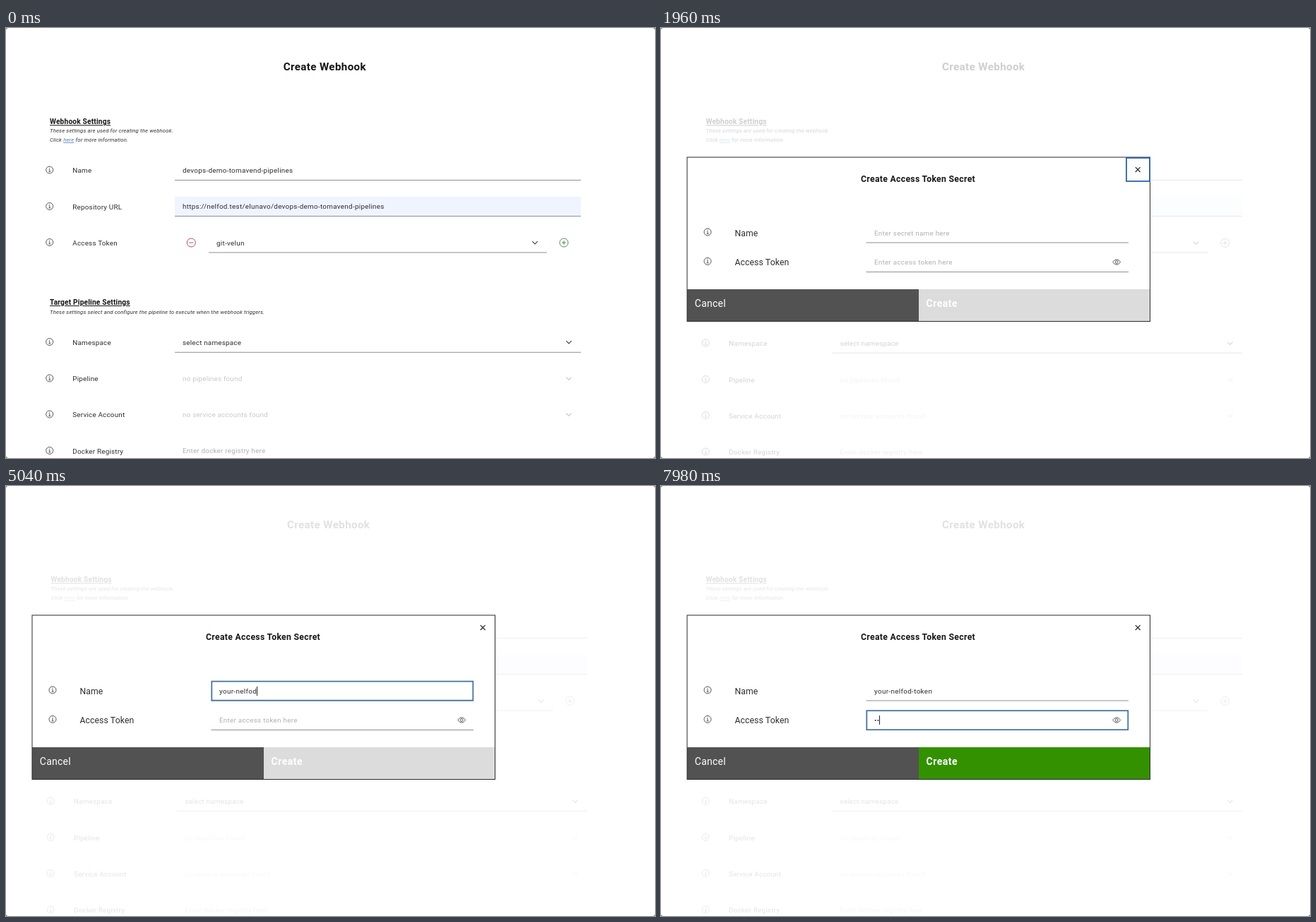
Write an HTML page that moves like this. It is 919 px wide and 609 px high and loops after 8000 ms.

```html
<!DOCTYPE html>
<html lang="en">
<head>
<meta charset="utf-8">
<title>Create Webhook</title>
<style>
  html, body { margin: 0; width: 100%; height: 100%; overflow: hidden; background: #777; }
  #stage { position: relative; width: 919px; height: 609px; overflow: hidden; border-radius: 4px; background: #fff; }
  #stage > *, svg { position: absolute; left: 0; top: 0; width: 919px; height: 609px; }

  text, .input { font-family: Roboto, "Open Sans", sans-serif; font-size: 9.9px; letter-spacing: .2px; fill: #2e2e2e; }
  .title { font-size: 15.2px; font-weight: 600; letter-spacing: .35px; fill: #161616; }
  .head { font-size: 10.2px; font-weight: 600; letter-spacing: .17px; fill: #161616; text-decoration: underline; }
  .note { font-size: 7.8px; font-style: italic; letter-spacing: .14px; fill: #333; }
  .link { fill: #4f7fb5; text-decoration: underline; }
  .value { letter-spacing: .28px; }
  .off { fill: #c8c8c8; }
  .empty { fill: #b0b0b0; }
  .dtitle { font-size: 12.2px; font-weight: 600; letter-spacing: .33px; fill: #161616; }
  .dlabel { font-size: 12.2px; letter-spacing: .13px; }
  .button { font-size: 14px; letter-spacing: .25px; fill: #fff; }
  .strong { font-weight: 600; letter-spacing: .5px; }

  .icon { fill: none; stroke: #444; stroke-width: .9; }
  .rule { stroke: #8f8f8f; stroke-width: 1; }
  .ring { fill: none; stroke: #47759f; stroke-width: 1.8; }

  .input { position: absolute; left: 302px; height: 13px; line-height: 13px; display: flex; white-space: pre; color: #2e2e2e; letter-spacing: .33px; }
  .caret { width: 1px; height: 13px; margin-right: -1px; background: #222; }
  .hint { color: #b0b0b0; letter-spacing: .25px; }
  .typed:not(:empty) ~ .hint { display: none; }

  #narrow, #wide, #veil, #dialog, .ring, .caret, #create { animation: 8s linear -5ms infinite; }
  #narrow { animation-name: narrow; animation-timing-function: step-end; }
  #wide { animation-name: wide; animation-timing-function: step-end; }
  #veil { background: #fff; animation-name: veil; }
  #dialog { animation-name: dialog; }
  #create { fill: #dcdcdc; animation-name: create; }
  .ring, .caret { animation-timing-function: step-end; }
  #ringClose { stroke: #2c63b0; animation-name: ringClose; }
  #ringName { animation-name: ringName; }
  #ringInfo { stroke: #5470a8; stroke-width: 1; animation-name: ringInfo; }
  #ringToken, #caretToken { animation-name: ringToken; }
  #caretName { animation-name: caretName; }

  @keyframes narrow { 0% { visibility: visible } 15.75%, 100% { visibility: hidden } }
  @keyframes wide { 0% { visibility: hidden } 15.75%, 100% { visibility: visible } }
  @keyframes veil {
    0% { opacity: 0 }
    15.75% { opacity: 0; animation-timing-function: steps(11) }
    25.375%, 100% { opacity: .87 }
  }
  @keyframes dialog {
    0% { opacity: 0; transform: translateY(-24px) }
    15.75% { opacity: 0; transform: translateY(-24px); animation-timing-function: steps(3) }
    18.375% { opacity: .65; transform: translateY(-5.5px); animation-timing-function: steps(2) }
    20.125%, 100% { opacity: 1; transform: none }
  }
  @keyframes create {
    0% { fill: #dcdcdc }
    97.125% { fill: #dcdcdc; animation-timing-function: steps(2) }
    98.875%, 100% { fill: #339100 }
  }
  @keyframes ringClose { 0% { opacity: 1 } 29.75%, 100% { opacity: 0 } }
  @keyframes ringName { 0% { opacity: 0 } 29.75% { opacity: 1 } 84.875%, 100% { opacity: 0 } }
  @keyframes ringInfo { 0% { opacity: 0 } 84.875% { opacity: 1 } 91%, 100% { opacity: 0 } }
  @keyframes ringToken { 0% { opacity: 0 } 91%, 100% { opacity: 1 } }
  @keyframes caretName {
    0% { opacity: 0 }
    29.75% { opacity: 1 } 35.875% { opacity: 0 }
    42.875% { opacity: 1 } 71.75% { opacity: 0 }
    76.125% { opacity: 1 } 84.875%, 100% { opacity: 0 }
  }
</style>
</head>
<body>
<div id="stage">
  <svg id="narrow"></svg>
  <svg id="wide"></svg>
  <div id="veil"></div>
  <div id="dialog">
    <svg id="panel"></svg>
    <div class="input" style="top:284px"><span class="typed" id="name"></span><i class="caret" id="caretName"></i><span class="hint">Enter secret name here</span></div>
    <div class="input" style="top:325px"><span class="typed" id="token"></span><i class="caret" id="caretToken"></i><span class="hint">Enter access token here</span></div>
  </div>
</div>
<script>
  const $ = id => document.getElementById(id);

  const text = (x, y, cls, str) => `<text x="${x}" y="${y}" class="${cls}">${str}</text>`;
  const line = (x1, x2, y) => `<line class="rule" x1="${x1}" x2="${x2}" y1="${y}" y2="${y}"/>`;
  const rect = (x, y, w, h, attrs) => `<rect x="${x}" y="${y}" width="${w}" height="${h}" ${attrs}/>`;
  const icon = (x, y, shape, color = '#444') =>
    `<g class="icon" transform="translate(${x} ${y})" style="stroke:${color}">${shape}</g>`;

  const info = '<circle r="5"/><path d="M-1-.8H.1V2.4M-1.4 2.4H1.5M-.5-2.6H.6"/>';
  const minus = '<circle r="6"/><path d="M-3 0H3"/>';
  const plus = '<circle r="6"/><path d="M-3 0H3M0-3V3"/>';
  const chevron = '<path stroke-width="1.2" d="M-3.7-1.8L0 1.9L3.7-1.8"/>';
  const cross = '<path stroke-width="1.2" d="M-3.4-3.4L3.4 3.4M3.4-3.4L-3.4 3.4"/>';
  const eye = '<path d="M-5.5 0Q0-7.4 5.5 0Q0 7.4-5.5 0Z"/><circle r="1.9"/>';

  // The form grows a little once the scrollbar is gone.
  function form(wide) {
    const X = x => wide ? +(x * 1.01 + .9).toFixed(1) : x;
    const Y = y => wide ? y + (y > 350 ? 1.5 : y > 190 ? .4 : 0) : y;
    const at = (x, y, cls, str) => text(X(x), Y(y), cls, str);
    const rule = (x1, x2, y) => line(X(x1), X(x2), wide && y > 350 ? y + 1 : y);
    const mark = (x, y, shape, color) => icon(X(x), Y(y), shape, color);

    const labels = [['Name', 205], ['Repository URL', 256.5], ['Access Token', 307.5], ['Namespace', 448.5],
      ['Pipeline', 500], ['Service Account', 551], ['Docker Registry', 602.5]];

    return [
      text(wide ? 398 : 392.7, 59.6, 'title', 'Create Webhook'),
      at(62, 136.3, 'head', 'Webhook Settings'),
      at(62, 148.4, 'note', 'These settings are used for creating the webhook.'),
      at(62, 161.2, 'note', 'Click <tspan class="link">here</tspan> for more information.'),
      at(62, 392, 'head', 'Target Pipeline Settings'),
      at(62, 404.8, 'note', 'These settings select and configure the pipeline to execute when the webhook triggers.'),
      ...labels.map(([str, y]) => mark(61.7, y - 4, info) + at(94.3, y, '', str)),

      at(250, 205, 'value', 'devops-demo-tomavend-pipelines'),
      rule(239, 814, 215.5),
      rect(X(239), 239, X(814) - X(239), 28, 'fill="#eff4ff"'),
      rule(239, 814, 266.5),
      at(250, 256, 'value', 'https://nelfod.test/elunavo/devops-demo-tomavend-pipelines'),
      mark(262.3, 304, minus, '#a04545'),
      at(298, 307.5, 'value', 'git-velun'),
      mark(749, 304, chevron),
      rule(287, 766, 318),
      mark(790, 304, plus, '#3f7a42'),

      at(250, 448.5, '', 'select namespace'),
      mark(797, 445, chevron),
      rule(239, 814, 459.3),
      at(250, 500, 'off', 'no pipelines found'),
      mark(797, 496.5, chevron, '#c8c8c8'),
      at(250, 551, 'off', 'no service accounts found'),
      mark(797, 547.5, chevron, '#c8c8c8'),
      at(250, 602, 'empty', 'Enter docker registry here')
    ].join('');
  }

  const panel = () => [
    rect(37, 183, 655.5, 232.5, 'fill="#fff"'),
    rect(37, 370, 328, 45.5, 'fill="#525252"'),
    rect(365, 370, 327.5, 45.5, 'id="create"'),
    rect(37, 183, 655.5, 232.5, 'fill="none" stroke="#2a2a2a"'),
    text(283, 217.7, 'dtitle', 'Create Access Token Secret'),
    icon(675.2, 200.6, cross, '#222'),
    rect(659, 184, 33, 33, 'class="ring" id="ringClose"'),
    icon(66, 289, info),
    text(104.4, 294.5, 'dlabel', 'Name'),
    line(290.5, 662, 304),
    rect(291.3, 276.7, 370, 27, 'class="ring" id="ringName"'),
    rect(59.7, 324.2, 12.6, 12.6, 'class="ring" id="ringInfo"'),
    icon(66, 330.4, info),
    text(104.4, 335.9, 'dlabel', 'Access Token'),
    line(290.5, 662, 345.5),
    rect(291.3, 318.2, 370, 27, 'class="ring" id="ringToken"'),
    icon(645.2, 331.5, eye),
    text(47.8, 395, 'button', 'Cancel'),
    text(375.6, 395, 'button strong', 'Create')
  ].join('');

  $('narrow').innerHTML = form(false);
  $('wide').innerHTML = form(true);
  $('panel').innerHTML = panel();

  // Key presses in ms
  const nameKeys = [3500, 3640, 3710, 3850, 4130, 4200, 4340, 4410, 4690, 4830, 4900, 5180, 5250, 6090, 6370, 6440, 6580];
  const tokenKeys = [7840, 7980];
  const typed = (str, keys, t) => str.slice(0, keys.filter(k => k <= t).length);

  let start;
  function tick(now) {
    start ??= now;
    const t = (now - start + 5) % 8000;
    $('name').textContent = typed('your-nelfod-token', nameKeys, t);
    $('token').textContent = typed('••', tokenKeys, t);
    requestAnimationFrame(tick);
  }
  requestAnimationFrame(tick);
</script>
</body>
</html>
```
